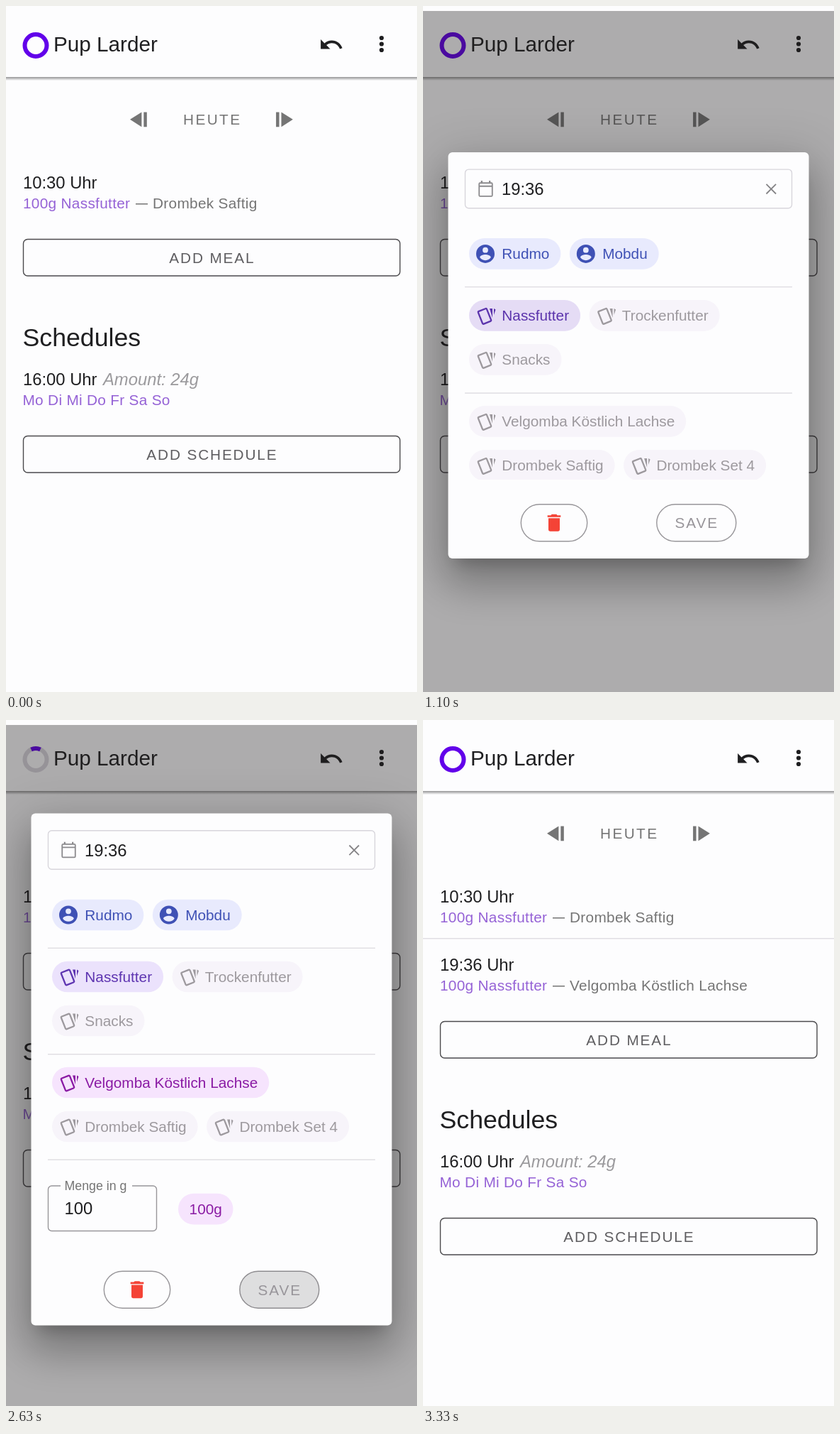
An HTML page with a canvas for the animation above (3.51 s loop, 580 by 966 pixels).

```html
<!DOCTYPE html>
<html lang="de">
<head>
<meta charset="utf-8">
<title>Feeding plan</title>
<style>
  html, body { margin: 0; width: 100%; height: 100%; overflow: hidden; background: #fdfdfe; }
  canvas { display: block; }
</style>
</head>
<body>
<canvas id="stage" width="580" height="966"></canvas>
<script>
const W = 580, H = 966, LOOP = 3510;
const FONT = '"Liberation Sans", Arial, sans-serif';
const PAPER = '#fdfdfe', INK = '#1f1f21', GREY = '#757575', LILAC = '#9562d6', VIOLET = '#6200ea';
const SMALL = 20.8, BODY = 23.8, BUTTON_SPACING = 1.86;

const CHIP = {
  idle: ['#f7f4fa', '#9d999e'],
  user: ['#e8eafd', '#3f51b5'],
  kind: ['#ebe2fc', '#5e35b1'],
  food: ['#f6e4fd', '#8a1ba4']
};

// Icons on a 24 unit grid
const ICON = {
  undo: 'M12.5,8C9.85,8 7.45,9 5.6,10.6L2,7V16H11L7.38,12.38C8.77,11.22 10.54,10.5 12.5,10.5C16.04,10.5 19.08,12.81 20.14,16L22.5,15.22C21.11,11.03 17.15,8 12.5,8Z',
  back: 'M19,5V19H16V5M14,5V19L3,12',
  next: 'M5,5V19H8V5M10,5V19L21,12',
  user: 'M12,19.2C9.5,19.2 7.3,17.9 6,16C6,14 10,12.9 12,12.9C14,12.9 18,14 18,16C16.7,17.9 14.5,19.2 12,19.2M12,5A3,3 0 0,1 12,11A3,3 0 0,1 12,5M12,2A10,10 0 0,0 12,22A10,10 0 0,0 12,2Z',
  trash: 'M19,4H15.5L14.5,3H9.5L8.5,4H5V6H19M6,19A2,2 0 0,0 8,21H16A2,2 0 0,0 18,19V7H6V19Z',
  calendar: 'M19,4H18V2H16V4H8V2H6V4H5A2,2 0 0,0 3,6V20A2,2 0 0,0 5,22H19A2,2 0 0,0 21,20V6A2,2 0 0,0 19,4M19.4,20.4H4.6V9.6H19.4V20.4M19.4,8H4.6V5.6H19.4V8Z'
};
for (const key in ICON) ICON[key] = new Path2D(ICON[key]);

const screen = document.getElementById('stage').getContext('2d');
const layer = Object.assign(document.createElement('canvas'), { width: W, height: H }).getContext('2d');
let ctx = screen;

const progress = (t, start, length) => Math.min(1, Math.max(0, (t - start) / length));
const easeOut = (p, power = 3) => 1 - (1 - p) ** power;
const easeInOut = p => p * p * (3 - 2 * p);

function text(str, x, y, size, color, { spacing = 0, align = 'left', italic = false } = {}) {
  ctx.font = `${italic ? 'italic ' : ''}${size}px ${FONT}`;
  ctx.letterSpacing = spacing + 'px';
  ctx.textAlign = align;
  ctx.fillStyle = color;
  ctx.fillText(str, x, y);
}

function measure(str, size) {
  ctx.font = `${size}px ${FONT}`;
  ctx.letterSpacing = '0px';
  return ctx.measureText(str).width;
}

function box(x, y, w, h, r, { fill, stroke, width = 1.4 }) {
  ctx.beginPath();
  ctx.roundRect(x, y, w, h, r);
  if (fill) { ctx.fillStyle = fill; ctx.fill(); }
  if (stroke) { ctx.strokeStyle = stroke; ctx.lineWidth = width; ctx.stroke(); }
}

function icon(name, cx, cy, scale, color) {
  ctx.save();
  ctx.translate(cx - 12 * scale, cy - 12 * scale);
  ctx.scale(scale, scale);
  ctx.fillStyle = color;
  ctx.fill(ICON[name], 'evenodd');
  ctx.restore();
}

function clipped(x, y, w, h, r, draw) {
  ctx.save();
  ctx.beginPath();
  ctx.roundRect(x, y, w, h, r);
  ctx.clip();
  draw();
  ctx.restore();
}

function disc(x, y, r, color) {
  ctx.beginPath();
  ctx.arc(x, y, r, 0, 7);
  ctx.fillStyle = color;
  ctx.fill();
}

function ring(x, y, color, from = 0, to = Math.PI * 2) {
  ctx.beginPath();
  ctx.arc(x, y, 15.5, from, to);
  ctx.strokeStyle = color;
  ctx.lineWidth = 6;
  ctx.stroke();
}

function ripple(t, start, cx, cy, maxR, [x, y, w, h, r], { grow = 150, hold = 190, strength = 0.12 } = {}) {
  const alpha = strength * progress(t, start, 60) * (1 - progress(t, start + hold, 200));
  if (alpha <= 0) return;
  const radius = maxR * (0.3 + 0.7 * progress(t, start, grow));
  clipped(x, y, w, h, r, () => disc(cx, cy, radius, `rgba(0,0,0,${alpha})`));
}

function divider(y, x = 59, w = 462) {
  ctx.fillStyle = '#dfdde2';
  ctx.fillRect(x, y, w, 1.4);
}

function spinner(t) {
  const cx = 42, cy = 55.5;
  if (t < 2520 || t > 2900) return ring(cx, cy, VIOLET);
  ring(cx, cy, '#d9d6de');
  if (t < 2700) {
    const half = 0.1 + 0.33 * progress(t, 2520, 110);
    ring(cx, cy, VIOLET, -Math.PI / 2 - half, -Math.PI / 2 + half);
  } else {
    const p = progress(t, 2700, 200);
    clipped(24, 37, 37, 37, 0, () => ring(cx - 16 * (1 - p), cy - 8 * (1 - p), VIOLET));
  }
}

function header(t) {
  const shade = ctx.createLinearGradient(0, 100, 0, 105);
  shade.addColorStop(0, 'rgba(0,0,0,.42)');
  shade.addColorStop(0.4, 'rgba(0,0,0,.25)');
  shade.addColorStop(1, 'rgba(0,0,0,0)');
  ctx.fillStyle = shade;
  ctx.fillRect(0, 100, W, 5);
  spinner(t);
  text('Pup Larder', 67, 64, 29.7, INK);
  icon('undo', 459, 54.5, 1.487, INK);
  for (const y of [45, 53.5, 62]) disc(530, y, 3.1, INK);
}

function meal(time, food, y) {
  text(time + ' Uhr', 24, y, BODY, INK);
  text('100g Nassfutter', 24, y + 28, SMALL, LILAC, { spacing: 0.3 });
  ctx.fillStyle = GREY;
  ctx.fillRect(183, y + 21, 17, 1.5);
  text(food, 207, y + 28, SMALL, GREY, { spacing: 0.3 });
}

function wideButton(label, y) {
  box(24.5, y, 531.5, 51.5, 6, { stroke: '#4b4a4d' });
  text(label, 290.9, y + 33.3, SMALL, '#5f5e61', { spacing: BUTTON_SPACING, align: 'center' });
}

function page(t) {
  const grown = easeOut(progress(t, 2748, 330));
  const listShift = 96 * grown;
  const mealShift = t < 2748 ? 0 : listShift + 27.5 * (1 - grown);

  header(t);
  icon('back', 188.4, 159.8, 1.487, GREY);
  icon('next', 391.5, 159.8, 1.487, GREY);
  text('HEUTE', 291.2, 167, SMALL, GREY, { spacing: 2.4, align: 'center' });
  meal('10:30', 'Drombek Saftig', 257);

  if (grown > 0) {
    clipped(0, 307, W, listShift, 0, () => {
      ctx.globalAlpha = progress(t, 2790, 150);
      divider(307, 0, W);
      meal('19:36', 'Velgomba Köstlich Lachse', 353);
    });
  }

  const row = [0, 307, W, 94, 0];
  const focus = 0.07 * progress(t, 30, 100) * (1 - progress(t, 700, 150));
  if (focus > 0) {
    ctx.fillStyle = `rgba(60,50,100,${focus})`;
    ctx.fillRect(0, 307, W, 94);
  }
  ripple(t, 60, 297, 354, 295, row, { grow: 300, hold: 290, strength: 0.22 });

  wideButton('ADD MEAL', 328.5 + mealShift);
  const y = listShift;
  text('Schedules', 23.5, 479 + y, 35.7, INK);
  text('16:00 Uhr', 24, 534 + y, BODY, INK);
  text('Amount: 24g', 137, 534 + y, BODY, '#9b9a9d', { italic: true });
  text('Mo Di Mi Do Fr Sa So', 23.5, 562 + y, SMALL, LILAC, { spacing: 0.3 });
  wideButton('ADD SCHEDULE', 605.5 + y);
}

function cards(x, y, color) {
  ctx.save();
  ctx.translate(x + 22, y + 1);
  ctx.rotate(-0.38);
  box(-6.5, -9.5, 13, 19, 1.5, { stroke: color, width: 2.3 });
  ctx.restore();
  ctx.fillStyle = color;
  ctx.beginPath();
  ctx.moveTo(x + 29, y - 10);
  ctx.lineTo(x + 33, y - 10);
  ctx.lineTo(x + 33, y + 3);
  ctx.closePath();
  ctx.moveTo(x + 35, y - 10);
  ctx.lineTo(x + 37.5, y - 8.5);
  ctx.lineTo(x + 35, y - 1);
  ctx.fill();
}

// Returns where the next chip in the row starts
function chip(label, x, y, style) {
  const [back, color] = CHIP[style];
  const width = 62.3 + measure(label, SMALL);
  box(x, y - 21.8, width, 43.6, 21.8, { fill: back });
  if (style === 'user') icon('user', x + 23, y, 1.3, color);
  else cards(x, y, color);
  text(label, x + 46.3, y + 7.2, SMALL, color);
  return x + width + 12.5;
}

function shadow(x, y, w, h, dy, blur, spread, alpha) {
  ctx.save();
  ctx.shadowColor = `rgba(0,0,0,${alpha})`;
  ctx.shadowOffsetY = dy * 1.487;
  ctx.shadowBlur = blur * 1.487;
  const s = spread * 1.487;
  // The caster sits off stage so that only its shadow shows
  ctx.shadowOffsetX = 2000;
  box(x - s - 2000, y - s, w + 2 * s, h + 2 * s, 6, { fill: '#000' });
  ctx.restore();
}

function timeField(top) {
  box(59.5, top + 24.2, 461, 54.6, 5, { stroke: '#d8d6dc' });
  icon('calendar', 88.5, top + 51.5, 1.13, '#8b8a8d');
  text('19:36', 111, top + 60.3, BODY, INK);
  ctx.strokeStyle = '#858487';
  ctx.lineWidth = 1.8;
  ctx.beginPath();
  for (const side of [-1, 1]) {
    ctx.moveTo(491.3 - 6.8 * side, top + 45);
    ctx.lineTo(491.3 + 6.8 * side, top + 58.6);
  }
  ctx.stroke();
}

function amountField(top) {
  box(59.5, top + 524.5, 153, 63.5, 5, { stroke: '#98969a' });
  ctx.fillStyle = PAPER;
  ctx.fillRect(77, top + 521, 101, 7);
  text('Menge in g', 82.5, top + 530, 17.8, GREY);
  text('100', 82.5, top + 564.2, BODY, INK);
  const [back, color] = CHIP.food;
  box(243, top + 535.3, 77.5, 43.6, 21.8, { fill: back });
  text('100g', 258.6, top + 564.3, SMALL, color);
}

function dialog(t) {
  const foods = easeOut(progress(t, 910, 260));
  const amount = easeOut(progress(t, 1720, 260));
  const height = 426 + 149 * foods + 146 * amount;
  const top = 492 - height / 2, bottom = top + height;
  const left = 35.5, width = 509;

  shadow(left, top, width, height, 11, 15, -7, 0.2);
  shadow(left, top, width, height, 24, 38, 3, 0.2);
  shadow(left, top, width, height, 9, 46, 8, 0.16);
  box(left, top, width, height, 6, { fill: PAPER });

  timeField(top);
  chip('Mobdu', chip('Rudmo', 65, top + 143, 'user'), top + 143, 'user');
  divider(top + 189);

  const kindY = top + 230;
  chip('Trockenfutter', chip('Nassfutter', 65, kindY, t < 900 ? 'idle' : 'kind'), kindY, 'idle');
  ripple(t, 760, 143, kindY, 90, [65, kindY - 21.8, 157, 43.6, 21.8]);
  chip('Snacks', 65, top + 292, 'idle');

  if (foods > 0) clipped(left, top + 315, width, 149 * foods, 0, () => {
    const y = top + 379;
    divider(top + 338.5);
    chip('Velgomba Köstlich Lachse', 65, y, t < 1710 ? 'idle' : 'food');
    ripple(t, 1530, 237.5, y, 155, [65, y - 21.8, 306, 43.6, 21.8]);
    chip('Drombek Set 4', chip('Drombek Saftig', 65, y + 62, 'idle'), y + 62, 'idle');
  });

  if (amount > 0) clipped(left, top + 464, width, 146 * amount, 0, () => {
    divider(top + 487);
    amountField(top);
  });

  const y = bottom - 50.3;
  box(138.3, y - 26, 93.4, 52, 26, { stroke: '#98969a' });
  icon('trash', 185, y, 1.33, '#f44336');
  box(329.8, y - 26, 112, 52, 26, { stroke: '#98969a' });
  ripple(t, 2440, 386, y, 64, [329.8, y - 26, 112, 52, 26], { hold: 230 });
  text('SAVE', 386.2, y + 7.3, SMALL, '#98959a', { spacing: BUTTON_SPACING, align: 'center' });
}

function drawDialog(t) {
  const opening = progress(t, 130, 300), closing = progress(t, 2640, 120);
  const alpha = easeOut(opening, 2.5) * (1 - closing);
  if (alpha <= 0) return;
  const scale = (0.5 + 0.5 * easeOut(opening, 4)) * (1 - 0.25 * closing);
  ctx = layer;
  ctx.clearRect(0, 0, W, H);
  ctx.save();
  ctx.translate(290, 492);
  ctx.scale(scale, scale);
  ctx.translate(-290, -492);
  dialog(t);
  ctx.restore();
  ctx = screen;
  ctx.globalAlpha = alpha;
  ctx.drawImage(layer.canvas, 0, 0);
  ctx.globalAlpha = 1;
}

function frame(now) {
  const t = now % LOOP;
  ctx.fillStyle = PAPER;
  ctx.fillRect(0, 0, W, H);
  page(t);
  const dim = 0.36 * easeInOut(progress(t, 150, 300)) * (1 - easeInOut(progress(t, 2640, 180)));
  ctx.fillStyle = `rgba(33,30,30,${dim})`;
  ctx.fillRect(0, 7, W, H - 7);
  drawDialog(t);
}

const begin = performance.now();
function tick() {
  frame(performance.now() - begin);
  requestAnimationFrame(tick);
}
tick();
</script>
</body>
</html>
```
